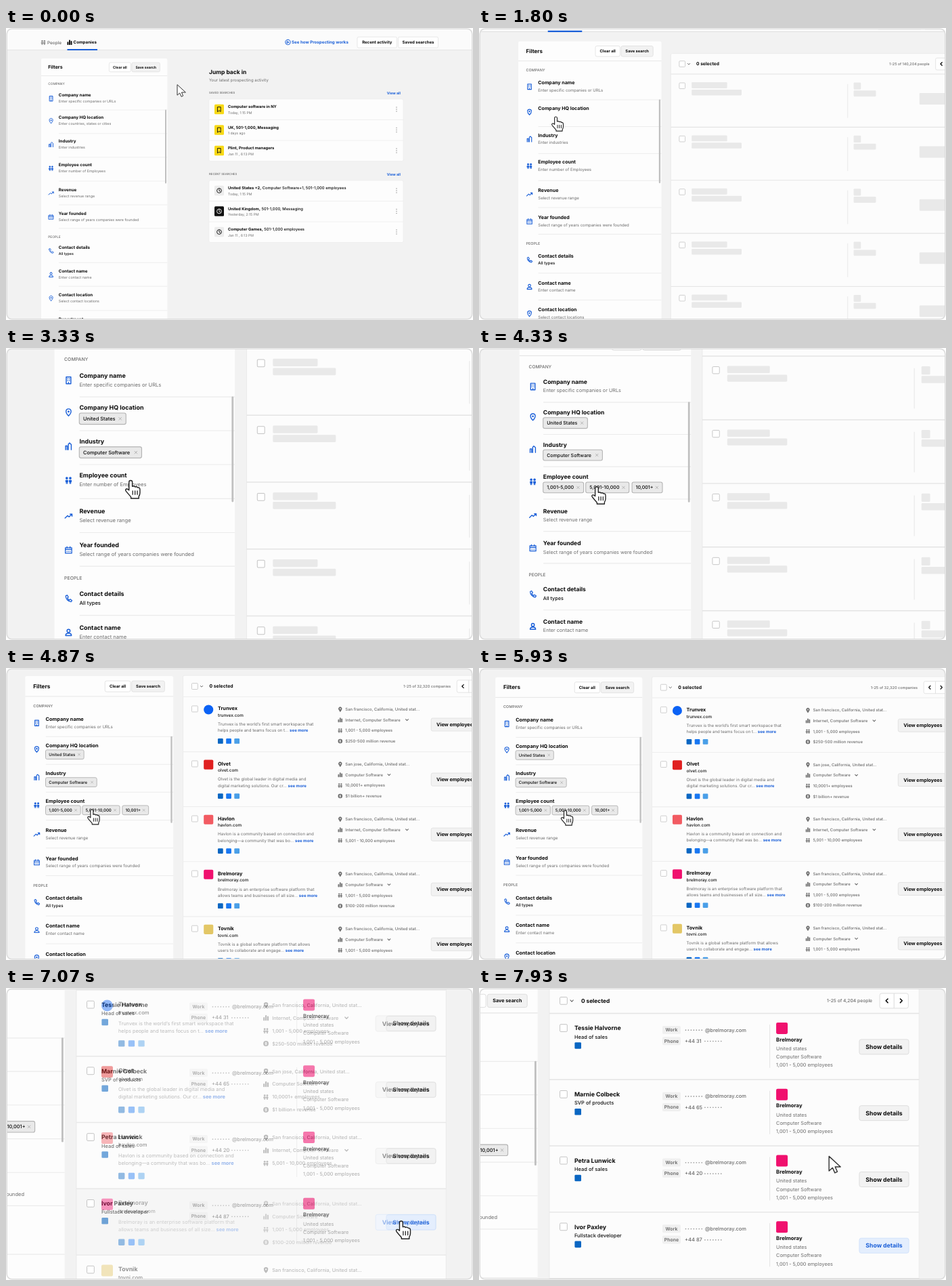
These frames come from a looping animation (690 px wide and 431 px high, 8 s). An HTML page:

```html
<!DOCTYPE html>
<html lang="en">
<head>
<meta charset="utf-8">
<title>Prospecting filters</title>
<style>
html, body { margin: 0; width: 100%; height: 100%; overflow: hidden; background: #fff; }
svg { display: block; width: 690px; height: 431px; }
text { font-family: Inter, "Open Sans", sans-serif; text-rendering: geometricPrecision; white-space: pre; }
</style>
</head>
<body>
<svg id="stage" viewBox="0 0 690 431"></svg>
<script>
const LOOP = 8000, STEP = 1000 / 15;
const BLUE = '#1a5fd8', INK = '#0a0a0a', GREY = '#6c6c6c', PINK = '#f0106e';
const ROW = 69;

// --- drawing helpers -------------------------------------------------
const text = (x, y, str, size, weight = 400, fill = INK, anchor = 'start') =>
  `<text x="${x}" y="${y + size * 0.35}" font-size="${size}" font-weight="${weight}" fill="${fill}" text-anchor="${anchor}">${str}</text>`;
const rect = (x, y, w, h, fill, r = 0, stroke = 'none', sw = 0.7) =>
  `<rect x="${x}" y="${y}" width="${w}" height="${h}" rx="${r}" fill="${fill}" stroke="${stroke}" stroke-width="${sw}"/>`;
const circle = (x, y, r, fill) => `<circle cx="${x}" cy="${y}" r="${r}" fill="${fill}"/>`;
const path = (d, stroke, sw = 1, fill = 'none') =>
  `<path d="${d}" fill="${fill}" stroke="${stroke}" stroke-width="${sw}" stroke-linecap="round" stroke-linejoin="round"/>`;
const line = (x1, y1, x2, y2, color = '#e6e6e6', w = 0.8) =>
  `<path d="M${x1} ${y1}L${x2} ${y2}" stroke="${color}" stroke-width="${w}"/>`;
const group = (body, id = '', x = 0, y = 0, scale = 1) =>
  `<g${id && ` id="${id}"`} transform="translate(${x} ${y}) scale(${scale})">${body}</g>`;
const button = (x, y, w, h, label, size, fill = '#f2f2f2', ink = INK, edge = '#dedede') =>
  rect(x, y, w, h, fill, 2, edge) + text(x + w / 2, y + h / 2, label, size, 700, ink, 'middle');
const dots = (x, y, n = 7, gap = 2.8) =>
  Array.from({ length: n }, (_, i) => circle(x + 1 + i * gap, y, 0.6, '#999')).join('');

const ICONS = {
  building: c => path('M-2.4 3.5v-7h4.8v7zM-.9-1.8v.1M.9-1.8v.1M-.9 0v.1M.9 0v.1M0 3.5V2', c),
  pin: c => path('M0 3.6C-3.8 0-3-3.6 0-3.6S3.8 0 0 3.6z', c) + circle(0, -0.8, 1, c),
  place: c => path('M0 3.6C-3.8 0-3-3.6 0-3.6S3.8 0 0 3.6z', c, 1, c) + circle(0, -0.9, 1, '#fcfcfc'),
  industry: c => path('M-3 3.5v-4h1.6v4M-.2 3.5V-2.2l1.2-1.3 1.8 1.6v5.4', c),
  people: c => [-1.8, 1.8].map(x => circle(x, -2.2, 1.3, c) +
    path(`M${x - 1} 0h2v1.6h-2zM${x - 0.5} 1.6v1.8M${x + 0.5} 1.6v1.8`, c, 0.8, c)).join(''),
  trend: c => path('M-3.6 2L-1-.5.5.8 3.6-2M1.6-2h2v2', c),
  calendar: c => path('M-3.3-2.4h6.6v5.7h-6.6zM-3.3-.6h6.6M-1.6-3.5v1.4M1.6-3.5v1.4M-1.6 1.4v.1M0 1.4v.1M1.6 1.4v.1', c, 0.9),
  phone: c => path('M-2.9-2.7l1.5-.8 1.2 2-1 .9q.6 1.4 2 2.2l1-.9 1.8 1.3-1 1.4C-.5 3-3 .3-2.9-2.7z', c, 0.9),
  user: c => path('M0-3.2a1.6 1.6 0 0 1 0 3.2a1.6 1.6 0 0 1 0-3.2zM-3 3.2q0-2.4 3-2.4t3 2.4z', c),
  bars: c => path('M-2.7 3v-3M0 3v-6M2.7 3v-4.5', c, 2),
  coin: c => circle(0, 0, 3.7, c) + path('M1.1-1.2q-2.4-1-2.4.2T0 0t1.2 1-2.4.2M0-2v4', '#fcfcfc', 0.7),
  clock: c => path('M0-3.4a3.4 3.4 0 0 1 0 6.8a3.4 3.4 0 0 1 0-6.8M0-1.8V.2L1.4 1', c, 0.9),
  mark: c => path('M-2.2-3.4h4.4v6.8L0 1.9-2.2 3.4z', c, 0.9)
};
const icon = (name, x, y, color, scale = 1) => group(ICONS[name](color), '', x, y, scale);

// --- top bar and start page ------------------------------------------
function header() {
  return rect(-20, -80, 760, 112, '#fbfbfb') + line(-20, 32.4, 740, 32.4, '#e3e3e3', 1) +
    icon('people', 55.2, 21.3, '#888', 0.95) + text(61, 21.3, 'People', 6.4, 500, '#666') +
    icon('bars', 94, 21.3, INK, 0.95) + text(99.6, 21.3, 'Companies', 6.2, 700) +
    rect(90.5, 31, 44.5, 2, BLUE) +
    path('M416.5 17.3a3.7 3.7 0 0 1 0 7.4a3.7 3.7 0 0 1 0-7.4M415.5 19.6l2.6 1.4-2.6 1.4z', BLUE) +
    text(422, 21, 'See how Prospecting works', 6.2, 700, BLUE) +
    button(519, 13.2, 58.5, 16, 'Recent activity', 6.05, '#fff') +
    button(579.5, 13.2, 59, 16, 'Saved searches', 6.05, '#fff');
}

function historyCard(top, label, items) {
  const rows = items.map(([title, when, glyph, tile, ink], i) => {
    const y = top + i * 30.5;
    return (i ? line(300, y, 587, y, '#ececec') : '') + rect(308, y + 7.7, 14, 14.5, tile, 1.5) +
      icon(glyph, 315, y + 15, ink) + text(328, y + 11, title, 5.85, 700) +
      text(328, y + 20.2, when, 5.1, 400, GREY) +
      [-3, 0, 3].map(d => circle(577, y + 15 + d, 0.7, '#888')).join('');
  });
  return text(300, top - 9.3, label, 4.3, 500, GREY) + text(583, top - 9.3, 'View all', 5.3, 700, BLUE, 'end') +
    rect(300, top, 287, 91.5, '#fdfdfd', 2, '#ececec') + rows.join('');
}

function startPage() {
  const soft = s => `<tspan font-weight="500">${s}</tspan>`, yellow = '#f7d916';
  return text(300, 65.5, 'Jump back in', 8.5, 700) +
    text(300, 77, 'Your latest prospecting activity', 6, 400, GREY) +
    historyCard(105, 'SAVED SEARCHES', [
      ['Computer software in NY', 'Today, 1:15 PM', 'mark', yellow, INK],
      ['UK, 501-1,000, Messaging', '1 days ago', 'mark', yellow, INK],
      ['Plint, Product managers', 'Jan 11 , 6:13 PM', 'mark', yellow, INK]]) +
    historyCard(225, 'RECENT SEARCHES', [
      ['United States +2,' + soft(' Computer Software+1, 501-1,000 employees'), 'Today, 1:15 PM', 'clock', '#ececec', INK],
      ['United Kingdom,' + soft(' 501-1,000, Messaging'), 'Yesterday, 2:15 PM', 'clock', '#111', '#fff'],
      ['Computer Games,' + soft(' 501-1,000 employees'), 'Jan 11 , 6:13 PM', 'clock', '#ececec', INK]]);
}

// --- filter sidebar ---------------------------------------------------
const chip = (id, x, y, w, label) => group(
  rect(x, y - 5.8, w, 11.6, '#e9e9e9', 1.8, '#b4b4b4', 0.8) + text(x + 4, y, label, 5.2, 500) +
  path(`M${x + w - 7.3} ${y - 1.3}l2.6 2.6m0-2.6l-2.6 2.6`, '#aaa', 0.6), id);

function sidebar() {
  const rows = [
    ['Company name', 'Enter specific companies or URLs', 99, 'building'],
    ['Company HQ location', 'Enter countries, states or cities', 132, 'pin'],
    ['Industry', 'Enter industries', 167, 'industry'],
    ['Employee count', 'Enter number of Employees', 202, 'people'],
    ['Revenue', 'Select revenue range', 239, 'trend'],
    ['Year founded', 'Select range of years companies were founded', 274, 'calendar'],
    ['Contact details', 'All types', 324, 'phone'],
    ['Contact name', 'Enter contact name', 359, 'user'],
    ['Contact location', 'Select contact locations', 394, 'pin'],
    ['Department', 'Select departments', 430, 'people']
  ].map(([title, hint, y, glyph], i) =>
    icon(glyph, 66.6, y + 5, BLUE) + text(77.8, y, title, 6.25, 700) +
    group(text(77.8, y + 9.4, hint, 5.3, i === 6 ? 500 : 400, i === 6 ? INK : GREY), 'hint' + i));
  return rect(52, 45, 186.3, 430, '#fdfdfd', 2) +
    text(62.2, 57.5, 'Filters', 7, 700) +
    button(152.4, 51, 32, 13.7, 'Clear all', 5.2, '#fff') + button(185.9, 51, 41.5, 13.7, 'Save search', 5.1) +
    line(52, 70.5, 238.3, 70.5) +
    text(62.2, 82.3, 'COMPANY', 4.8, 500, GREY) + text(62.2, 308, 'PEOPLE', 4.8, 500, GREY) +
    [121, 155.8, 190.8, 226, 261, 295.7, 346.3, 381.3, 417].map(y => line(78, y, 238.3, y, '#ebebeb')).join('') +
    rows.join('') +
    chip('chipUS', 77.7, 143.5, 48.2, 'United States') +
    chip('chipSoft', 77.7, 178.3, 64.4, 'Computer Software') +
    chip('chipA', 77.7, 213.4, 44, '1,001-5,000') +
    chip('chipB', 124, 213.4, 47, '5,001-10,000') +
    chip('chipC', 174.2, 213.4, 33, '10,001+') +
    rect(235, 120.5, 2, 109, '#c0c0c0', 1);
}

// --- result lists -----------------------------------------------------
const checkbox = y => rect(261.5, y - 3.8, 7.6, 7.6, '#fff', 1, '#c4c4c4');

function list(id, count, rowBody, divider = '#e4e4e4') {
  const rows = Array.from({ length: 6 }, (_, i) => group(
    rowBody(i) + checkbox(86.2) + line(250.5, 140, 636, 140, divider, 1), '', 0, i * ROW));
  return group(rect(250.5, 44.2, 385.5, 440, '#fcfcfc', 2, '#e8e8e8', 0.6) +
    checkbox(57.8) + path('M272.4 57.2l1.5 1.5 1.5-1.5', '#666', 0.8) +
    text(283.7, 57.8, '0 selected', 5.85, 700) + text(587.2, 57.8, count, 4.75, 500, GREY, 'end') +
    rect(595, 50.1, 29.8, 15.5, '#fff', 2, '#dedede') + line(609.9, 50.1, 609.9, 65.6, '#dedede') +
    path('M603.4 55.8l-2 2 2 2M616.4 55.8l2 2-2 2', INK, 1.1) +
    line(250.5, 71, 636, 71, divider, 1) + rows.join(''), id);
}

const bone = (x, y, w, h) => rect(x, y, w, h, '#e9e9e9', 1);
const skeletonRow = () => bone(277.6, 81.6, 46.2, 7.8) + bone(277.6, 91.2, 65, 7.5) +
  line(480.6, 84, 480.6, 128, '#e8e8e8') + bone(488.4, 82, 9.4, 9) + bone(488.4, 92.4, 29, 7.8) +
  bone(574, 95.7, 51, 15);

const SF = 'San francisco, California, United stat...', SMALL = '1,001 - 5,000 employees';
const COMPANIES = [
  ['Trunvex', 'trunvex.com', 'is the world’s first smart workspace that', 'helps people and teams focus on t...', '#0b62f5',
    SF, 'Internet, Computer Software', SMALL, '$250-500 million revenue'],
  ['Olvet', 'olvet.com', 'is the global leader in digital media and', 'digital marketing solutions. Our cr...', '#e02020',
    'San jose, California, United stat...', 'Computer Software', '10,0001+ employees', '$1 billion+ revenue'],
  ['Havlon', 'havlon.com', 'is a community based on connection and', 'belonging—a community that was bo...', '#f25b62',
    SF, 'Internet, Computer Software', '5,001 - 10,000 employees'],
  ['Brelmoray', 'brelmoray.com', 'is an enterprise software platform that', 'allows teams and businesses of all size...', PINK,
    SF, 'Computer Software', SMALL, '$100-200 million revenue'],
  ['Tovnik', 'tovni.com', 'is a global software platform that allows', 'users to collaborate and engage...', '#e3c766',
    SF, 'Computer Software', SMALL]
];

function companyRow(i) {
  const c = COMPANIES[i];
  if (!c) return '';
  const [name, site, about, about2, color, ...facts] = c;
  const glyphs = ['place', 'bars', 'people', 'coin'];
  const logo = i ? rect(276.6, 81.2, 12, 12, color, 1.5) : circle(282.6, 87.2, 6, color);
  const info = facts.map((f, k) => {
    const y = 86.7 + k * 13.35;
    return icon(glyphs[k], 448.2, y, '#6c6c6c', 0.75) + text(454.6, y, f, 5.1, 500, GREY);
  }).join('');
  const chevron = path(`M${facts[1].length > 20 ? 530.6 : 508} 99.2l1.6 1.6 1.6-1.6`, '#666', 0.9);
  const body = text(294.3, 85.8, name, 6.2, 700) + text(294.3, 94.4, site, 5.4, 500, '#111') +
    text(294.3, 105.6, name + ' ' + about, 5.25, 400, GREY) +
    text(294.3, 113.4, `${about2} <tspan font-weight="700" fill="${BLUE}">see more</tspan>`, 5.2, 400, GREY) +
    info + chevron;
  const social = rect(294.3, 123.4, 6.6, 6.6, '#0a66c2', 1) + rect(304.7, 123.4, 6.6, 6.6, '#1877f2', 1) + rect(315, 123.4, 6.6, 6.6, '#4a9fe8', 1);
  const hot = i === 3;
  return (hot ? group(rect(250.5, 70.8, 385.5, 69.4, '#f0f0f0'), 'hoverBg') : '') + logo +
    group(body, hot ? 'hoverBody' : '') + social +
    button(562.6, 97.8, 62.7, 16.2, 'View employees', 6.15) +
    (hot ? group(button(562.6, 97.8, 62.7, 16.2, 'View employees', 6.15, '#e4eefd', BLUE, '#c3d9fa'), 'hoverBtn') : '');
}

const STAFF = [
  ['Tessie Halvorne', 'Head of sales', '31'], ['Marnie Colbeck', 'SVP of products', '65'],
  ['Petra Lunwick', 'Head of sales', '20'], ['Ivor Paxley', 'Fullstack developer', '87']
];

function personRow(i) {
  const p = STAFF[i];
  if (!p) return '';
  const badge = (y, s) => rect(368.4, y - 4.2, 19, 8.4, '#f0f0f0', 1.2) + text(377.9, y, s, 4.9, 600, '#666', 'middle');
  const hot = i === 3;
  return text(276.6, 86.4, p[0], 6.2, 700) + text(276.6, 95.3, p[1], 5.3, 500, '#111') +
    rect(276.9, 101.1, 6.8, 6.8, '#0a66c2', 1) +
    badge(88.2, 'Work') + dots(391.7, 88.4) + text(412.8, 88.2, '@brelmoray.com', 5.3, 500, GREY) +
    badge(99.7, 'Phone') + text(391.7, 99.7, '+44 ' + p[2], 5.3, 500, '#666') + dots(411.8, 99.9) +
    line(480.3, 82.6, 480.3, 127.7, '#e6e6e6') + rect(487, 80.5, 12, 12, PINK, 1.5) +
    text(487, 98.1, 'Brelmoray', 5.45, 700) + text(487, 107.6, 'United states', 5.15, 400, GREY) +
    text(487, 116.1, 'Computer Software', 5.15, 400, GREY) + text(487, 124.9, SMALL, 5.15, 400, GREY) +
    button(573.7, 98.1, 51.6, 15.5, 'Show details', 6.15, hot ? '#e4eefd' : '#f2f2f2', hot ? BLUE : INK, hot ? '#d3e3fb' : '#dedede');
}

// --- scene ------------------------------------------------------------
const arrow = path('M0 0V15.2L3.7 12 6.1 17.3 8.7 16.1 6.4 11H12z', '#333', 1, '#fff');
const hand = path('M-1.8 1.7a1.7 1.7 0 0 1 3.4 0V6.2q1.8-.8 2.9.5q1.8-.7 2.8.7q2.2-.3 2.2 2.2v3.2q0 2-1.2 3.8v2H.2v-1.5L-4.6 11.5q-1.6-2 .2-2.7q1.3-.3 2.6 1.3z', '#222', 1, '#fff') +
  path('M2 10.8v3.8M4.4 10.8v3.8M6.8 10.8v3.8', '#222', 0.9);

const stage = document.getElementById('stage');
stage.innerHTML = rect(0, 0, 690, 431, '#f2f2f2') + group(
  header() + group(startPage(), 'start') +
  list('skeleton', '1-25 of 140,204 people', skeletonRow) +
  list('companies', '1-25 of 32,320 companies', companyRow, '#eeeeee') +
  list('people', '1-25 of 4,204 people', personRow) +
  sidebar() + group(group(arrow, 'arrow') + group(hand, 'hand'), 'cursor'), 'world') +
  '<path d="M0 0H690V431H0zM9 1.5Q1.5 1.5 1.5 9V422Q1.5 429.5 9 429.5H681Q688.5 429.5 688.5 422V9Q688.5 1.5 681 1.5z" fill="#fff" fill-rule="evenodd"/>' +
  rect(1.2, 1.2, 687.6, 428.6, 'none', 7.5, '#dcdcdc', 1.6);

const el = {};
stage.querySelectorAll('[id]').forEach(n => { el[n.id] = n; });

// --- motion -----------------------------------------------------------
const clamp = x => Math.max(0, Math.min(1, x));

// cubic-bezier(0, 0, .58, 1)
function easeOut(x) {
  if (x <= 0 || x >= 1) return clamp(x);
  let lo = 0, hi = 1;
  for (let i = 0; i < 24; i++) {
    const m = (lo + hi) / 2;
    if (1.74 * (1 - m) * m * m + m * m * m < x) lo = m; else hi = m;
  }
  return lo * lo * (3 - 2 * lo);
}
const ramp = (t, a, b) => clamp((t - a) / (b - a));
const track = (t, from, moves) => moves.reduce((v, [start, dur, ...to]) => {
  const k = easeOut((t - start) / dur);
  return v.map((a, i) => a + (to[i] - a) * k);
}, from);

const CAMERA = [
  [1130, 800, 1.1416, -1.1, -32.8], [2000, 800, 1.431, -2.9, -101],
  [4200, 800, 1.163, -34.2, -38.1], [5930, 540, 1.417, -251, -97.6], [7800, 800, 1.417, -251, 35]
];
const POINTER = [
  [1130, 800, 94.3, 145.6], [2000, 800, 114, 189], [2870, 800, 136, 212.7],
  [5930, 540, 589.3, 311.6], [7800, 800, 408, -41]
];

function show(id, k) {
  el[id].setAttribute('opacity', k);
  el[id].setAttribute('display', k > 0 ? 'inline' : 'none');
}
const move = (id, x, y, s = 1) => el[id].setAttribute('transform', `translate(${x} ${y}) scale(${s})`);

function draw(t) {
  const [s, x, y] = track(t, [1, 0, 0], CAMERA);
  move('world', x, y, s);
  move('cursor', ...track(t, [253, 84], POINTER));
  const pointing = t > 1500 && t < 7840;
  show('hand', +pointing);
  show('arrow', +!pointing);

  show('start', 1 - ramp(t, 1130, 1450));
  show('skeleton', +(t > 1130 && t < 4900));
  move('skeleton', 0, 390 * (1 - easeOut((t - 1130) / 800)));
  show('companies', t < 7400 ? ramp(t, 4400, 4800) : 0);
  show('people', ramp(t, 6730, 7330));

  show('hint1', 1 - ramp(t, 1450, 1730));
  show('chipUS', ramp(t, 1800, 1930));
  show('hint2', 1 - ramp(t, 2530, 2670));
  show('chipSoft', ramp(t, 2600, 2800));
  show('hint3', 1 - ramp(t, 3400, 3660));
  ['chipA', 'chipB', 'chipC'].forEach((id, i) => show(id, +(t > 3725 + i * STEP)));

  const hover = ramp(t, 6260, 6460);
  show('hoverBg', hover);
  show('hoverBtn', hover);
  show('hoverBody', 1 - 0.3 * hover);
}

function tick() {
  const t = performance.now() % LOOP;
  draw(Math.floor((t + 5) / STEP) * STEP % LOOP);
  requestAnimationFrame(tick);
}
tick();
</script>
</body>
</html>
```
